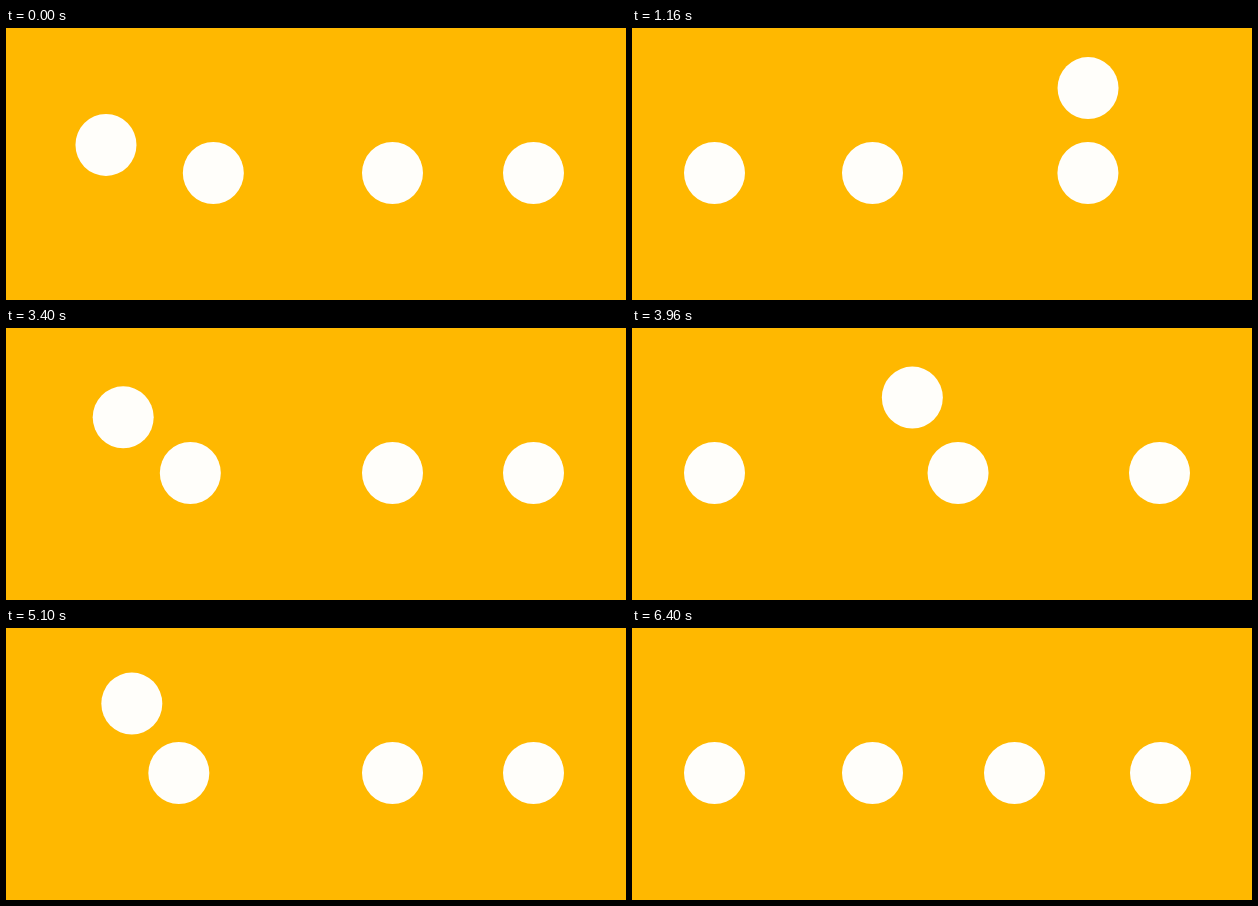
An HTML page for the animation above (6.43 s loop, 620 by 272 pixels).

```html
<!DOCTYPE html>
<html lang="en">
<head>
<meta charset="utf-8">
<title>Hopping dots</title>
<style>
  html, body { margin: 0; width: 100%; height: 100%; overflow: hidden; background: #ffb800; }
  svg { display: block; width: 620px; height: 272px; }
</style>
</head>
<body>
<svg viewBox="0 0 620 272" fill="#fffefa"></svg>
<script>
const LOOP = 6430, CYCLE = 1665, OFFSET = 107, GROUND = 145;
const home = [82.5, 240.5, 386.5, 527.5];
const land = [82.5, 240.5, 382.5, 528.5];

// In swap i the hopper jumps over its right neighbour, which slides left beneath it.
const swaps = [
  { lift: 37, slide: 7, end: 488, apex: { x: 138, y: 56 } },
  { lift: 535, slide: 543, end: 1014, apex: { x: 287.5, y: 56 } },
  { lift: 1037, slide: 1037, end: 1505, apex: { x: 457, y: 59 } }
];

const svg = document.querySelector('svg');
const dots = home.map(() => {
  const dot = document.createElementNS('http://www.w3.org/2000/svg', 'ellipse');
  dot.setAttribute('rx', 30.5);
  dot.setAttribute('ry', 31);
  return svg.appendChild(dot);
});

const mix = (a, b, p) => a + (b - a) * p;
const progress = (time, from, to) => Math.min(1, Math.max(0, (time - from) / (to - from)));

function place(dot, x, y = GROUND) {
  dot.setAttribute('cx', x);
  dot.setAttribute('cy', y);
}

// Straight up to the apex in the first half, straight down in the second.
function hop(i, time) {
  const { lift, end, apex } = swaps[i];
  const p = progress(time, lift, end);
  const height = 1 - Math.abs(2 * p - 1);
  const foot = p < 0.5 ? land[i] : land[i + 1];
  place(dots[0], mix(foot, apex.x, height), mix(GROUND, apex.y, height));
}

const start = performance.now();

function draw() {
  const time = ((performance.now() - start) % LOOP + OFFSET) % CYCLE;
  swaps.forEach(({ lift, slide, end }, i) => {
    if (i === 0 || time >= lift) hop(i, time);
    place(dots[i + 1], mix(home[i + 1], land[i], progress(time, slide, end)));
  });
  requestAnimationFrame(draw);
}
draw();
</script>
</body>
</html>
```
